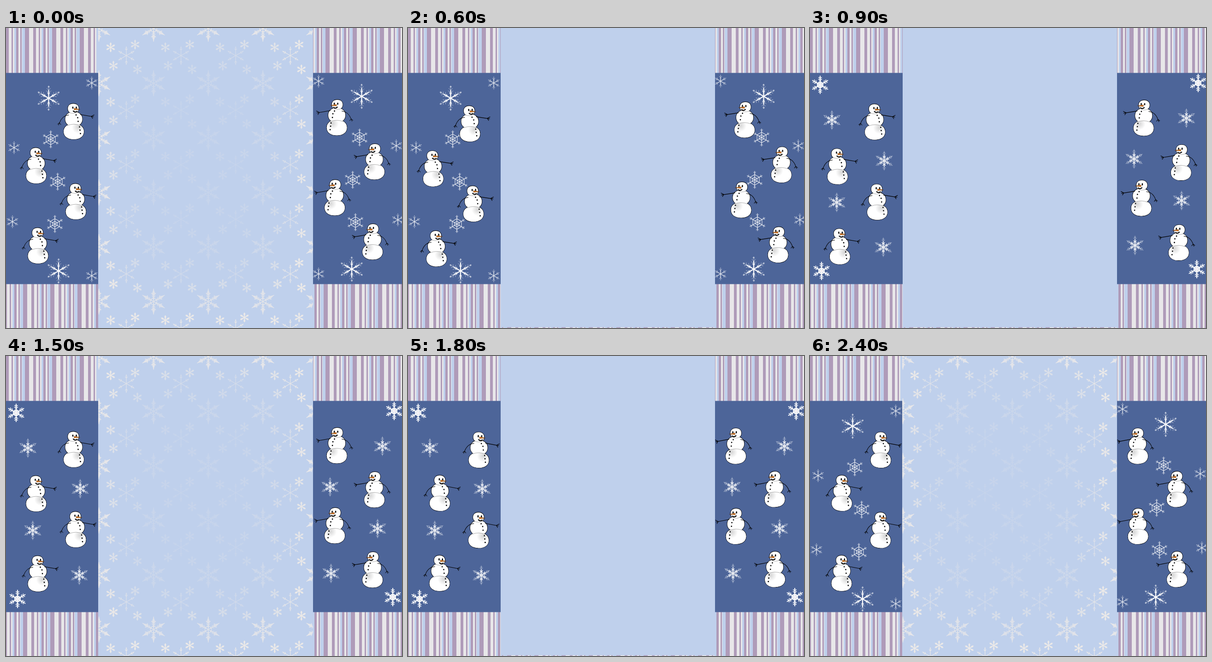
Recreate the animation shown at these times as an HTML page. Size 859x652 px, loop 2.7 s.

```html
<!DOCTYPE html>
<html lang="en">
<head>
<meta charset="utf-8">
<title>Snowmen</title>
<style>
html, body { margin: 0; width: 100%; height: 100%; overflow: hidden; background: #bfd0ec; }
svg { display: block; width: 100%; height: 100%; }
</style>
</head>
<body>
<svg id="stage" viewBox="0 0 859 652"></svg>
<script>
const MAUVE = '#af9bb9', PALE = '#e8e7e9', SKY = '#bfd0ec', NAVY = '#4d6599';

const rect = (x, y, w, h, fill) =>
  `<rect x="${x}" y="${y}" width="${w}" height="${h}" fill="${fill}"/>`;
const line = (d, width, extra = '') =>
  `<path d="${d}" stroke-width="${width}" fill="none" ${extra}/>`;
const use = (id, x, y, extra = '') => `<use href="#${id}" x="${x}" y="${y}" ${extra}/>`;

// Six copies of one upright arm around the origin.
function flake(id, arm, attrs, centre = '') {
  const arms = Array.from({ length: 6 }, (_, i) => `<g transform="rotate(${i * 60})">${arm}</g>`);
  return `<g id="${id}" ${attrs}>${arms.join('')}${centre}</g>`;
}
// V-shaped twigs at the given radius.
const twig = (r, w, h) => `M${-w},${-r - h}L0,${-r}L${w},${-r - h}`;
// One side of a hexagon with its corners on the arms.
const side = r => `M0,${-r}L${r * 0.866},${-r / 2}`;

const white = 'stroke="#fff" stroke-linecap="round"';
const cream = 'stroke="#ebe9e8" fill="#ebe9e8"';
const flakes =
  flake('crystal',
    line('M0,0V-17', 2.2) + line(twig(8, 2.5, 3.5), 1.2) +
    line('M0,-17V-26' + twig(12, 5.5, 4) + twig(18, 4, 3) + 'M-2,-24H2', 0.9, 'opacity=".55"') +
    '<circle cy="-25.5" r="1.1" stroke-width=".7" fill="none" opacity=".8"/>', white) +
  flake('lace',
    line('M0,0V-18.5', 1.3) + line(twig(14.5, 2.8, 2.4), 1, 'opacity=".8"') +
    line(side(11.5) + side(6), 1.1), white + ' opacity=".85"') +
  flake('tiny',
    line('M0,0V-7', 1.4) + line('M0,-7V-13.5' + twig(7.5, 2.6, 3), 1, 'opacity=".75"'),
    white + ' opacity=".85"') +
  flake('frost',
    line('M0,0V-19', 2) + line(twig(9, 3.5, 3.5) + twig(13.5, 3.2, 2.8), 1.5) +
    line(side(7), 1.8), white,
    '<circle r="5.5" fill="#fff" stroke="none" opacity=".75"/><circle r="1.1" fill="#e6c8d4" stroke="none"/>') +
  flake('bead',
    line('M0,0V-12' + twig(7, 2.6, 3), 1.7) + line(side(7.5), 1.3) +
    line('M0,-12V-20.5' + twig(12.5, 3, 3) + 'M-2,-17.5H2', 1, 'opacity=".65"'),
    white + ' opacity=".88"', '<circle r="4.5" fill="#fff" stroke="none" opacity=".6"/>') +
  flake('fern',
    line('M0,0V-28', 1.4) +
    line(twig(5, 2.5, 3) + twig(9, 3.5, 4) + twig(13, 5, 5.5), 1.2) +
    '<path d="M0,-27L3.6,-17.5L0,-14L-3.6,-17.5Z" stroke="none" opacity=".8"/>' +
    line(side(8), 0.9), cream) +
  flake('spoke', line('M0,0V-20' + twig(12, 2.6, 2.8) + 'M-1.6,-17H1.6', 1.2), cream) +
  flake('petal',
    '<path d="M0,0L-1.2,-4L-2.1,-8L0,-11L2.1,-8L1.2,-4Z" stroke="none"/>', cream,
    '<circle r="2.6" stroke="none"/>');

// Stripe runs inside one period: start, width, colour.
const PERIOD = 59.25;
const runs = [[0, 9, MAUVE], [9, 9, PALE], [18, 6, MAUVE], [24, 6, PALE], [30, 3, MAUVE],
  [33, 3, PALE], [36, 4, SKY], [40, 5, MAUVE], [45, 4, PALE], [49, 3, MAUVE], [52, 1, PALE],
  [53, 6.25, SKY]];
function stripes(x0, x1, y, h, origin) {
  let out = '';
  const first = Math.floor((x0 - origin) / PERIOD);
  for (let p = origin + first * PERIOD; p < x1; p += PERIOD)
    for (const [s, w, fill] of runs) {
      const a = Math.max(x0, Math.round(p + s)), b = Math.min(x1, Math.round(p + s + w));
      if (b > a) out += rect(a, y, b - a, h, fill);
    }
  return out;
}

// Repeating snowfall, strongest along the edges.
const TILE = 118.6;
const motifs = [['fern', 201.5, 1.5], ['spoke', 261, 60], ['petal', 227, 42],
  ['petal', 280, 36], ['petal', 233, 82], ['petal', 285, 90]];
function snowfall() {
  let out = '';
  for (const [id, x0, y0] of motifs)
    for (let row = 0; row < 6; row++)
      for (let col = 0; col < 5; col++) {
        const x = x0 + col * TILE, y = y0 + row * TILE;
        const fade = 0.18 + ((x - 425) / 232) ** 4 + ((y - 305) / 330) ** 4;
        out += use(id, x.toFixed(1), y.toFixed(1), `opacity="${Math.min(1, fade).toFixed(2)}"`);
      }
  return out;
}

const dots = [[5, -36], [8.5, -30], [9.5, -22], [12.5, -10], [13.5, -3], [14.5, 4.5]];
// Slightly squared ball: centre and half sizes.
function ball([x, y, a, b], attrs) {
  const u = a * 0.62, v = b * 0.62;
  return `<path d="M${x - a},${y}C${x - a},${y - v} ${x - u},${y - b} ${x},${y - b}` +
    `S${x + a},${y - v} ${x + a},${y}S${x + u},${y + b} ${x},${y + b}S${x - a},${y + v} ${x - a},${y}Z" ${attrs}/>`;
}
const balls = [[-1, -50, 11.8, 10.6], [0, -27, 18.6, 15.8], [0, 0, 21.8, 16.8]];
const snowman = `<g id="snowman" stroke-linecap="round">
  ${balls.map(b => ball(b, 'fill="#fff" stroke="#000" stroke-width="1.6"')).join('')}
  ${balls.map(b => ball(b, 'fill="#fff"')).join('')}
  ${ball(balls[2], 'fill="url(#shade)"')}
  <g stroke="#999">${line('M-14,-13Q0,-19 14,-13', 0.8)}${line('M-9,-41Q0,-37 8,-42', 0.8)}</g>
  <g stroke="#000">
    ${line('M14,-37L43,-32M38,-33L44,-36M38,-33L41,-28.5', 1.2)}
    ${line('M-11,-36Q-25,-35 -31,-19M-31,-19L-35,-16M-31,-19L-33,-14M-31,-19L-28,-15', 1)}
    ${line('M-1,-44.5Q3,-40.5 7,-44', 2.2)}
  </g>
  <ellipse cx="-2" cy="-52" rx="1.3" ry="2.6"/><ellipse cx="5.5" cy="-52" rx="1.3" ry="2.6"/>
  <path d="M1,-50.5L13.5,-48.2L1,-46.8Z" fill="#e07a1c" stroke="#5a3010" stroke-width=".6"/>
  ${dots.map(([x, y]) => `<circle cx="${x}" cy="${y}" r="1.4"/>`).join('')}
</g>`;

const iceA = [['crystal', 92.5, 152.5], ['crystal', 114, 528], ['lace', 97, 242], ['lace', 112, 334],
  ['lace', 106, 426], ['tiny', 186, 119.5], ['tiny', 17.5, 260], ['tiny', 14, 421], ['tiny', 186, 538.5]];
const iceB = [['frost', 22, 123.5], ['frost', 25, 528], ['bead', 47.5, 200], ['bead', 161, 288.5],
  ['bead', 58, 379], ['bead', 159, 476.5]];
const place = list => list.map(f => use(...f)).join('');

const TOP = 41, BOTTOM = 36.8, LEFT = 201, RIGHT = 666;
const stage = document.getElementById('stage');
stage.innerHTML = `<defs>
  <radialGradient id="shade" gradientUnits="userSpaceOnUse" cx="9" cy="-9" r="13">
    <stop offset="0" stop-color="#d6d6d6"/><stop offset="1" stop-color="#fff"/>
  </radialGradient>
  <clipPath id="left"><rect y="98" width="200" height="458"/></clipPath>
  <clipPath id="right"><rect x="${RIGHT}" y="98" width="193" height="458"/></clipPath>
  <clipPath id="middle"><rect x="200" width="${RIGHT - 200}" height="652"/></clipPath>
  ${flakes}${snowman}
  <g id="ice"><g id="iceA">${place(iceA)}</g><g id="iceB">${place(iceB)}</g></g>
  <g id="crowd">${'<use href="#snowman" class="man"/>'.repeat(4)}</g>
</defs>
${rect(0, 0, 859, 652, SKY)}
${stripes(0, LEFT, 0, 98, TOP)}${stripes(RIGHT, 859, 0, 98, TOP)}
${stripes(0, LEFT, 556, 96, BOTTOM)}${stripes(RIGHT, 859, 556, 96, BOTTOM)}
${rect(0, 97.6, LEFT, 459, NAVY)}${rect(RIGHT, 97.6, 859 - RIGHT, 459, NAVY)}
<g id="snow" clip-path="url(#middle)">${rect(200, 0, RIGHT - 200, 652, SKY)}${snowfall()}</g>
<g id="hem">${stripes(204, RIGHT, 650.5, 1.5, BOTTOM)}</g>
<g clip-path="url(#left)"><use href="#ice"/><use href="#crowd"/></g>
<g clip-path="url(#right)">
  <use href="#ice" transform="translate(864,-4) scale(-1,1)"/>
  <use href="#crowd" transform="translate(864.6,-8.5) scale(-1,1)"/>
</g>`;

const home = [[147, 225], [65.5, 321], [151.5, 399], [69.5, 495]];
// Sway poses: tilt in degrees, then the shift of each snowman.
const poses = [
  { tilt: 0, shift: [[0, 0], [0, 0], [0, 0], [0, 0]] },
  { tilt: -0.4, shift: [[-6, 1], [-5.7, 1.8], [-5.5, 1.2], [-4.7, 1.8]] },
  { tilt: -0.9, shift: [[-12.5, 5], [-10.7, 6.6], [-9.5, 5], [-7.5, 6.5]] },
  { tilt: 1, shift: [[6.5, 1.2], [3.5, -1], [1.5, 1.5], [-1, -1]] },
  { tilt: 2.8, shift: [[14.5, 2.2], [9.5, -2], [5, 2.7], [0, -2]] }
];
const STEP = 300;
const sway = [0, 1, 2, 1, 1, 0, 3, 4, 3];
const snowing = [1, 1, 0, 0, 1, 1, 0, 0, 1];
const firstIce = [1, 1, 1, 0, 0, 0, 0, 0, 1];

const men = [...stage.querySelectorAll('.man')];
const show = (id, on) => document.getElementById(id).setAttribute('display', on ? 'inline' : 'none');
let shown = -1;

function draw(ms) {
  const i = Math.floor(ms / STEP) % sway.length;
  if (i === shown) return;
  shown = i;
  const { tilt, shift } = poses[sway[i]];
  men.forEach((man, k) => {
    const x = home[k][0] + shift[k][0], y = home[k][1] + shift[k][1];
    man.setAttribute('transform', `translate(${x},${y}) rotate(${tilt})`);
  });
  show('snow', snowing[i]);
  show('hem', !snowing[i]);
  show('iceA', firstIce[i]);
  show('iceB', !firstIce[i]);
}

const start = performance.now();
function tick() {
  draw(performance.now() - start);
  requestAnimationFrame(tick);
}
draw(0);
requestAnimationFrame(tick);
</script>
</body>
</html>
```
